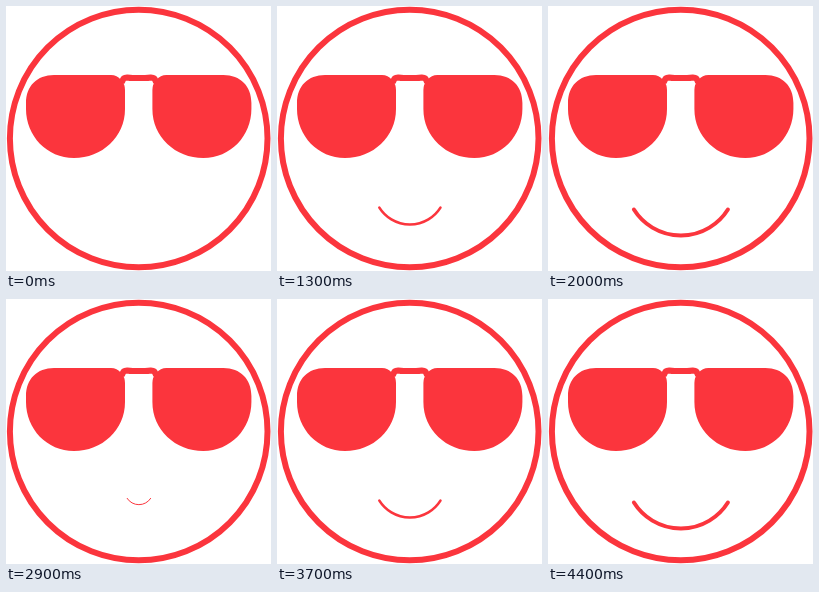
An HTML page that plays this animation: 265 px wide and 265 px high, repeating every 5.1 s.

```html
<!DOCTYPE html>
<html lang="en">
<head>
<meta charset="utf-8">
<title>Smile</title>
<style>
  html, body { margin: 0; width: 100%; height: 100%; overflow: hidden; background: #fff; }
  svg { display: block; width: 100%; height: 100%; }
</style>
</head>
<body>
<svg viewBox="0 0 265 265" fill="none" stroke="#fb353d" stroke-linecap="round" stroke-linejoin="round">
  <defs>
    <path id="lens" fill="#fb353d" stroke="none"
      d="M20 97C20 80 31 69 48 69H105Q111 69 115 74Q119 78 119 84V103C119 131 96 152 68 152C41 152 20 130 20 103Z"/>
  </defs>
  <circle cx="132.7" cy="132.5" r="128.8" stroke-width="6"/>
  <use href="#lens"/>
  <use href="#lens" transform="matrix(-1 0 0 1 265.4 0)"/>
  <path stroke-width="6" d="M116.5 75Q117 71.5 121 71.5Q124 72 127 72H139Q142 72 145 71.5Q149 71.5 149.5 75"/>
  <path id="smile" stroke-width="4" d="M-47 5.5A55.5 55.5 0 0 0 47 5.5"/>
</svg>
<script>
  const LOOP = 5100, SECOND_SMILE = 2400, GROW = 2000, STEP = 100;
  const smile = document.getElementById('smile');

  function smileScale(time) {
    const local = time < SECOND_SMILE ? time : time - SECOND_SMILE;
    let step = Math.floor(Math.min(local, GROW) / STEP);
    if (step === 2) step = 1; // the first small step lasts twice as long
    return step * STEP / GROW;
  }

  function render(time) {
    const scale = smileScale(time % LOOP);
    smile.setAttribute('visibility', scale ? 'visible' : 'hidden');
    smile.setAttribute('transform', `translate(132.9 198) scale(${scale})`);
  }

  const start = performance.now();
  function tick() {
    render(performance.now() - start);
    requestAnimationFrame(tick);
  }
  tick();
</script>
</body>
</html>
```
